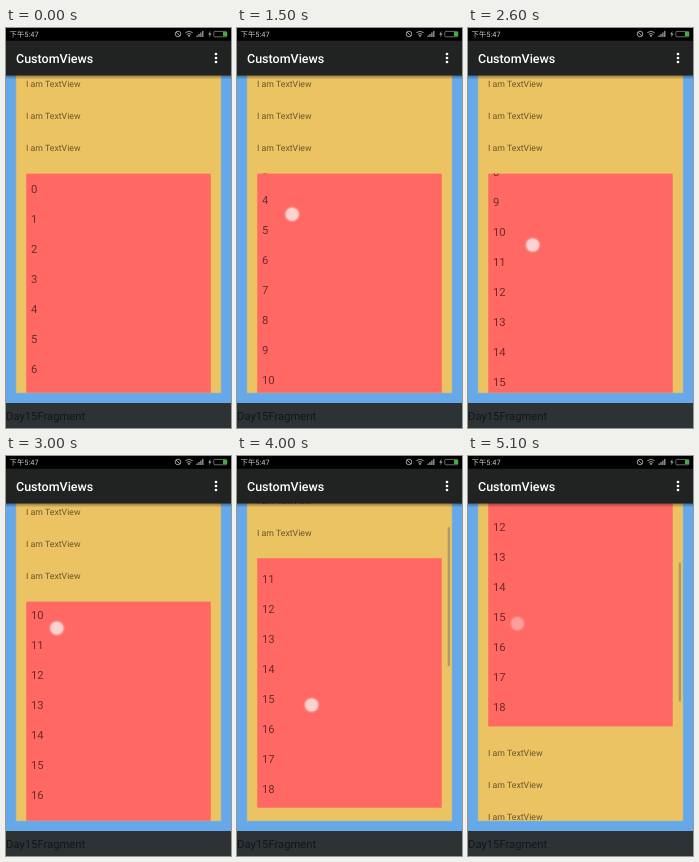
Recreate the animation shown at these times as an HTML page. Size 225 by 400 pixels, loop 5200 ms.

```html
<!DOCTYPE html>
<html lang="en">
<head>
<meta charset="utf-8">
<title>Nested scrolling</title>
<style>
  html, body { margin: 0; width: 100%; height: 100%; overflow: hidden; background: #000; }
  svg { display: block; width: 100vw; height: 100vh; font-family: Roboto, "Noto Sans CJK SC", sans-serif; }
  text { text-rendering: geometricPrecision; }
  .label { font-size: 8.75px; fill: #000; fill-opacity: .56; }
  .item { font-size: 11.25px; fill: #000; fill-opacity: .58; }
</style>
</head>
<body>
<svg viewBox="0 0 225 400">
  <defs>
    <clipPath id="page"><rect x="10" y="47" width="205" height="318"/></clipPath>
    <clipPath id="card"><rect x="20" y="145.4" width="185" height="250" rx="1"/></clipPath>
    <linearGradient id="shade" x2="0" y2="1">
      <stop stop-opacity=".4"/><stop offset="1" stop-opacity="0"/>
    </linearGradient>
    <radialGradient id="glow">
      <stop offset=".7" stop-color="#fff" stop-opacity=".4"/><stop offset="1" stop-color="#fff" stop-opacity="0"/>
    </radialGradient>
  </defs>

  <rect y="47" width="225" height="328" fill="#66a9ea"/>
  <rect x="10" y="47" width="205" height="318" fill="#ecc363"/>
  <g clip-path="url(#page)">
    <g id="content">
      <g id="labels"></g>
      <g clip-path="url(#card)">
        <rect x="20" y="145.4" width="185" height="250" rx="1" fill="#ff6863" stroke="#f59563"/>
        <g id="list"></g>
      </g>
    </g>
    <rect id="bar" x="210.7" width="2.3" height="139" fill="#666" fill-opacity=".45"/>
  </g>
  <rect x="10" y="40" width="205" height="325" fill="none" stroke="#a9b6a6" stroke-opacity=".6"/>

  <rect y="375" width="225" height="25" fill="#2d3235"/>
  <text class="item" x="0" y="392">Day15Fragment</text>

  <rect y="47" width="225" height="4.5" fill="url(#shade)"/>
  <rect y="12.5" width="225" height="35" fill="#212323"/>
  <text x="10" y="35" font-size="12.5" font-weight="500" fill="#fff">CustomViews</text>
  <path d="M210 26v0M210 30v0M210 34v0" stroke="#fff" stroke-width="2.7" stroke-linecap="round"/>

  <rect width="225" height="12.5" fill="#000"/>
  <text x="3.5" y="8.7" font-size="7.4" fill="#ccc">下午5:47</text>
  <g fill="none" stroke="#aaa" stroke-width=".9">
    <circle cx="172" cy="6" r="2.8"/><path d="M170 4l4 4"/>
    <path d="M179.3 4.7q3.7-3 7.4 0M180.8 6.4q2.2-1.8 4.4 0"/>
    <rect x="207.8" y="3.4" width="13" height="5.4" rx="1" stroke="#777"/>
  </g>
  <path d="M183 9.3l-1.4-1.7q1.4-1 2.8 0zM190.5 9V7.5h1.2V9zM192.4 9V6h1.2v3zM194.3 9V4.5h1.2V9zM196.2 9V3h1.2v6zM204.6 2.8l-2.4 3.6h1.6l-.8 3 2.5-4h-1.6z" fill="#aaa"/>
  <rect x="217" y="4" width="4" height="4.2" fill="#3fae3c"/>

  <g id="touch">
    <circle r="8.6" fill="url(#glow)"/>
    <circle r="6.3" fill="#fff" fill-opacity=".5"/>
  </g>
</svg>
<script>
const LOOP = 5200, STEP = 100;
const TRAVEL = 129, SLOP = 3, FLING = 50, LIST_END = 325;
const byId = id => document.getElementById(id);
const clamp = v => Math.min(1, Math.max(0, v));
const easeOut = (t, begin, end) => 1 - (1 - clamp((t - begin) / (end - begin))) ** 1.35;

// Three identical upward swipes: two move the list, the last moves the page.
const swipes = [[900, 1700], [2100, 3100], [3550, 5150]];

function addText(parent, kind, x, y, value) {
  const node = document.createElementNS("http://www.w3.org/2000/svg", "text");
  node.setAttribute("class", kind);
  node.setAttribute("x", x);
  node.setAttribute("y", y);
  node.textContent = value;
  byId(parent).append(node);
}

for (const top of [59.2, 425.2])
  for (let i = 0; i < 3; i++) addText("labels", "label", 20, top + i * 32, "I am TextView");
for (let i = 0; i < 19; i++) addText("list", "item", 25, 165 + i * 30, i);

function draw(t) {
  const [first, second, third] = swipes.map(([begin, end]) => easeOut(t, begin, end));
  // After each list swipe the list glides on until it stops or reaches its end.
  const glide = FLING * (easeOut(t, 1700, 2100) + easeOut(t, 3100, 3500));
  const list = Math.min(LIST_END, TRAVEL * (first + second) + glide);
  const page = Math.max(0, TRAVEL * third - SLOP);

  byId("list").setAttribute("transform", `translate(0 ${-list})`);
  byId("content").setAttribute("transform", `translate(0 ${-page})`);
  byId("bar").setAttribute("y", 52.3 + page * .435);
  byId("bar").setAttribute("opacity", clamp(page / 8));

  const active = swipes.find(([begin, end]) => t >= begin && t < end);
  const p = active ? easeOut(t, ...active) : 0;
  byId("touch").setAttribute("transform", `translate(${89 - 40 * p} ${295.4 - TRAVEL * p})`);
  byId("touch").setAttribute("opacity", active ? clamp((active[1] - t) / 100) : 0);
}

const start = performance.now();
function tick() {
  const t = (performance.now() - start) % LOOP;
  draw(Math.floor(t / STEP) * STEP);
  requestAnimationFrame(tick);
}
tick();
</script>
</body>
</html>
```
